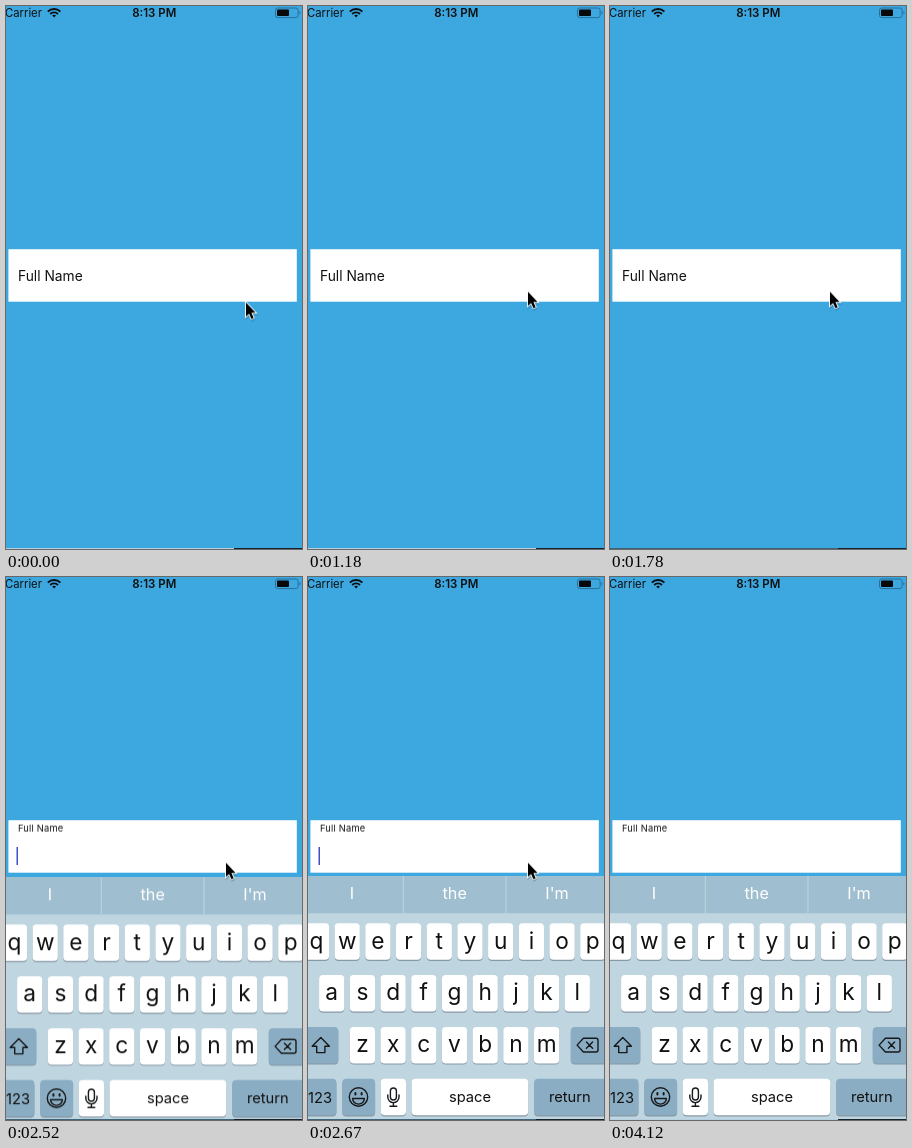
These frames come from a looping animation (296x543 px, 4.22 s). An HTML page:

```html
<!DOCTYPE html>
<html lang="en">
<head>
<meta charset="utf-8">
<title>Floating label input</title>
<style>
  html, body { margin: 0; width: 100%; height: 100%; overflow: hidden; background: #3da7e0; }
  svg { display: block; width: 296px; height: 543px; font-family: Inter, Roboto, sans-serif; fill: #111; }
  .mid { text-anchor: middle; }
  .letter { font-size: 22.7px; }
  .word { font-size: 14.7px; }
  .line { fill: none; stroke: #16191b; stroke-width: 1.4; stroke-linejoin: round; stroke-linecap: round; }
  .anim { animation: 4220ms step-end infinite; }

  #pointer { animation-name: pointer; }
  #label { animation-name: label; }
  #caption { animation-name: caption; }
  #caret { animation-name: caret; }
  #keyboard { animation-name: keyboard; }
  #hints { animation-name: hints; }
  #tint { animation-name: tint; }
  #edge { animation-name: edge; }

  @keyframes pointer {
    0% { transform: translate(240px, 296.5px); }
    13.98% { transform: translate(231.5px, 293px); }
    17.53% { transform: translate(223.5px, 290px); }
    21.08% { transform: translate(220.4px, 290px); }
    24.40% { transform: translate(220px, 286.3px); }
    27.96% { transform: translate(220px, 285.7px); }
    80.80% { transform: translate(220px, 295px); opacity: 1; }
    84.36%, 100% { transform: translate(220px, 295px); opacity: 0; }
  }
  @keyframes label {
    0% { opacity: 1; }
    56.16%, 100% { opacity: 0; }
  }
  @keyframes caption {
    0% { opacity: 0; transform: translateY(.4px); }
    56.16% { opacity: 1; transform: translateY(.4px); }
    59.71%, 100% { opacity: 1; transform: none; }
  }
  @keyframes caret {
    0% { opacity: 0; }
    56.16% { opacity: 1; }
    66.82% { opacity: .5; }
    70.37% { opacity: 0; }
    77.48% { opacity: .5; }
    80.80% { opacity: 1; }
    91.23% { opacity: .5; }
    94.54%, 100% { opacity: 0; }
  }
  @keyframes keyboard {
    0% { transform: translateY(250px); }
    56.16% { transform: translateY(10px); }
    59.71% { transform: translateY(1.2px); }
    63.27%, 100% { transform: none; }
  }
  @keyframes hints {
    0% { opacity: .6; }
    59.71%, 100% { opacity: 1; }
  }
  @keyframes tint {
    0% { opacity: .2; }
    59.71%, 100% { opacity: 0; }
  }
  @keyframes edge {
    0% { opacity: 0; }
    42.18% { opacity: 1; }
    94.54%, 100% { opacity: 0; }
  }
</style>
</head>
<body>
<svg viewBox="0 0 296 543">
  <rect width="296" height="543" fill="#3da7e0"/>

  <!-- status bar -->
  <text x="-1" y="11" font-size="11.3">Carrier</text>
  <g fill="none" stroke="#0c0f12" stroke-width="1.9">
    <path d="M41.8 5.6a9 9 0 0 1 12.6 0M44.2 8a5.6 5.6 0 0 1 7.8 0"/>
    <path d="M48.1 11.6l-1.9-2a2.7 2.7 0 0 1 3.8 0z" fill="#0c0f12" stroke="none"/>
  </g>
  <text class="mid" x="148.3" y="11" font-size="11.5" font-weight="600">8:13 PM</text>
  <rect x="269.5" y="2" width="22.6" height="9.6" rx="2.2" fill="none" stroke="#28709a"/>
  <rect x="271" y="3.5" width="12" height="6.6" rx="1" fill="#060809"/>
  <path d="M293.4 5a2 2 0 0 1 0 3.6z" fill="#28709a"/>

  <!-- field -->
  <rect x="2.4" y="243.2" width="288.4" height="52.5" fill="#fff"/>
  <text id="label" class="anim" x="12" y="275" font-size="13.8">Full Name</text>
  <text id="caption" class="anim" x="12" y="255" font-size="9.3" letter-spacing=".2">Full Name</text>
  <rect id="caret" class="anim" x="10.5" y="270" width="1.5" height="18" fill="#3f50c8"/>

  <!-- keyboard -->
  <g id="keyboard" class="anim">
    <rect y="299" width="296" height="260" fill="#bfd5e0"/>
    <rect y="299" width="296" height="37.3" fill="#9fbfd0"/>
    <rect id="tint" class="anim" y="299" width="296" height="37.3" fill="#3da7e0"/>
    <path d="M95.3 299v37M198 299v37" stroke="#c2d8e3" stroke-width=".9"/>
    <g id="hints" class="anim mid" fill="#fff" font-size="16.2">
      <text x="44" y="321.7">I</text>
      <text x="146.7" y="321.7">the</text>
      <text x="249" y="321.7">I'm</text>
    </g>
    <g id="keys"></g>
    <path class="line" d="M12.8 460.6l8.6 8.7h-4.5v6.3h-8.2v-6.3h-4.5z"/>
    <path class="line" d="M275.4 461.2h12.6a2 2 0 0 1 2 2v9.8a2 2 0 0 1-2 2h-12.6l-6.3-6.9zM278.4 465l6.2 6.2M284.6 465l-6.2 6.2"/>
    <g class="line" stroke-width="1.3">
      <circle cx="50.5" cy="520" r="9.2"/>
      <path d="M44.6 521.5h11.8a5.9 5.6 0 0 1-11.8 0z"/>
      <path d="M47.4 516v1.6M53.6 516v1.6" stroke-width="2"/>
      <rect x="82.4" y="511" width="6" height="12" rx="3"/>
      <path d="M79.8 518v2a5.6 5.6 0 0 0 11.2 0v-2M85.4 525.8v3.3M82 529.2h6.8"/>
    </g>
  </g>

  <!-- bottom row -->
  <rect y="542" width="228" height="1" fill="#b4cfdf"/>
  <rect x="228" y="542" width="68" height="1" fill="#16222b"/>
  <rect id="edge" class="anim" y="542" width="228" height="1" fill="#3f6379"/>

  <g id="pointer" class="anim">
    <path d="M0 0V14L3.1 11.2L5.5 16.4L7.7 15.4L5.4 10.3H9.6Z" fill="#000" opacity=".2" transform="translate(.4 1.2)" stroke="#000" stroke-width="2"/>
    <path d="M0 0V14L3.1 11.2L5.5 16.4L7.7 15.4L5.4 10.3H9.6Z" fill="#000" stroke="#fff" stroke-width="1.8" paint-order="stroke"/>
  </g>
</svg>
<script>
  const keys = document.getElementById('keys');
  const pitch = 30.7, keyW = 25.2, keyH = 36.5;

  function add(tag, attrs, text = '') {
    const el = document.createElementNS('http://www.w3.org/2000/svg', tag);
    for (const name in attrs) el.setAttribute(name, attrs[name]);
    el.textContent = text;
    keys.append(el);
  }

  function key(x, y, width, fill = '#fff') {
    const box = { x, width, height: keyH, rx: 4 };
    add('rect', { ...box, y: y + 1.1, fill: '#8699a5' });
    add('rect', { ...box, y, fill });
  }

  function letters(row, first, y) {
    [...row].forEach((char, i) => {
      const x = first + i * pitch;
      key(x - keyW / 2, y, keyW);
      add('text', { class: 'mid letter', x, y: y + 25.2 }, char);
    });
  }

  const gray = '#8badc3';
  letters('qwertyuiop', 8.5, 346.3);
  letters('asdfghjkl', 23.7, 398.1);
  letters('zxcvbnm', 54.4, 449.9);
  key(-10, 449.9, 40.3, gray);
  key(262.8, 449.9, 44, gray);
  key(-10, 501.8, 38.4, gray);
  key(34.3, 501.8, 32.8, gray);
  key(72.8, 501.8, 25.2);
  key(103.6, 501.8, 116.6);
  key(226.2, 501.8, 80, gray);
  add('text', { class: 'mid word', x: 12, y: 526 }, '123');
  add('text', { class: 'mid word', x: 162, y: 524.7 }, 'space');
  add('text', { class: 'mid word', x: 261.8, y: 524.7 }, 'return');
</script>
</body>
</html>
```
